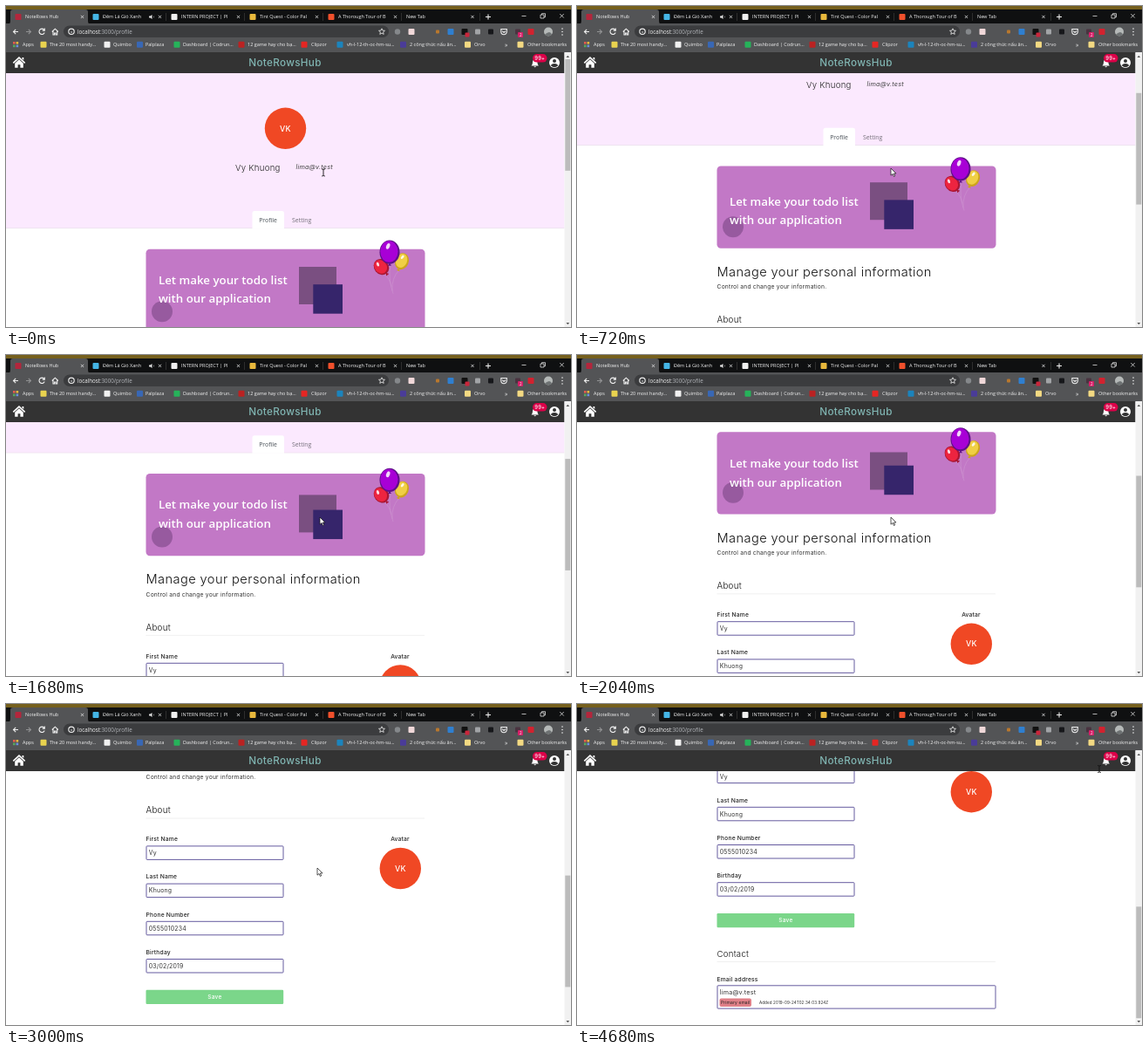
Animation, 648 px wide and 368 px high, one loop 4.8 s. Source, as an HTML page:

```html
<!DOCTYPE html>
<html lang="en">
<head>
<meta charset="utf-8">
<title>NoteRows Hub</title>
<style>
html, body { margin: 0; width: 100%; height: 100%; overflow: hidden; background: #fff; }
svg { display: block; width: 100vw; height: 100vh; }
text { font-family: Inter, sans-serif; letter-spacing: .029em; white-space: pre; }
.ui { font-family: "Open Sans", "Noto Sans", sans-serif; letter-spacing: 0; }
.mid { text-anchor: middle; }
.line { fill: none; stroke: #ececec; stroke-width: .8; }
.icon { fill: none; stroke: #f0f0f0; stroke-width: 1.1; }
</style>
</head>
<body>
<svg id="stage" viewBox="0 0 648 368"></svg>
<script>
const text = (x, y, str, size, fill = '#222', attrs = '') =>
  `<text x="${x}" y="${y}" font-size="${size}" fill="${fill}" ${attrs}>${str}</text>`;
const ui = (x, y, str, size = 5.5, fill = '#f4f4f4', attrs = '') =>
  text(x, y, str, size, fill, `class="ui" ${attrs}`);
const rect = (x, y, w, h, fill, r = 0, attrs = '') =>
  `<rect x="${x}" y="${y}" width="${w}" height="${h}" rx="${r}" fill="${fill}" ${attrs}/>`;
const disc = (x, y, r, fill) => `<circle cx="${x}" cy="${y}" r="${r}" fill="${fill}"/>`;
const path = (d, attrs = 'class="icon"') => `<path d="${d}" ${attrs}/>`;
const group = (id, content) => `<g id="${id}">${content}</g>`;
const cross = (x, y, s) => path(`M${x - s} ${y - s}l${2 * s} ${2 * s}m0 ${-2 * s}l${-2 * s} ${2 * s}`,
  'fill="none" stroke="#e8e8e8" stroke-width=".8"');
const square = (x, y, s, fill) => rect(x - s / 2, y - s / 2, s, s, fill, 1);

const CHROME = '#535456';
const user = { first: 'Vy', last: 'Khuong', initials: 'VK', mail: 'lima@v.test', phone: '0555010234' };

function tabStrip() {
  const tabs = [
    [10, 'NoteRows Hub', '#b3263c'],
    [99, 'Đêm Lá Gió Xanh', '#45b5e6'],
    [189, 'INTERN PROJECT | Pl', '#f0f0f0'],
    [279, 'Tint Quest - Color Pal', '#e8b83c'],
    [369, 'A Thorough Tour of B', '#f0502c'],
    [459, 'New Tab']
  ];
  let out = rect(0, 0, 648, 5, '#76601e') + rect(0, 4, 648, 17, '#0f1011') +
    path('M2 21Q5 21 5 17V7q0-3 3-3H91q3 0 3 3V17q0 4 3 4z', `fill="${CHROME}"`);
  tabs.forEach(([x, name, color], i) => {
    if (color) out += square(x + 4, 12.5, 7, color);
    out += ui(color ? x + 12 : x, 14.3, name) + cross(i == 5 ? 535 : x + 77.5, 12.4, 1.6);
    if (i) out += rect(x + 84, 8, .6, 9, '#444');
  });
  return out +
    path('M164 11.5h1.5l2-1.5v5l-2-1.5H164zM169 11q1 1.500 0 3', 'fill="#ddd"') +
    path('M550 12.500h6M553 9.500v6') +
    path('M591.500 11.500h5M613 10h4v4h-4zM614.500 10V8.700h4v4H617', 'fill="none" stroke="#ddd" stroke-width=".8"') +
    cross(637.5, 11.3, 2.2);
}

function toolBar() {
  const extensions = [
    [495, 4, '#b9782d'], [510, 7, '#2f7fd0'], [526, 7, '#111'], [541, 6, '#a2a4a7'],
    [556, 6, '#16171a'], [587, 6, '#4a3340'], [602, 7, '#d3222f']
  ];
  return rect(0, 20, 648, 33.5, CHROME) + rect(66, 22.5, 373, 13.5, '#3b3c3e', 6.7) +
    path('M14 29.500H8.500m2.700-2.700l-2.700 2.700 2.700 2.700') +
    path('M23 29.500h5.500m-2.700-2.700l2.700 2.700-2.700 2.700', 'class="icon" opacity=".4"') +
    path('M43.700 27.300A3.200 3.200 0 1 0 44.200 30.500M44.300 25.500v2.600h-2.600') +
    path('M52.800 29.500L56.300 26.200 59.800 29.500M54 29v4h1.600v-2h1.500v2h1.600v-4') +
    '<circle cx="75" cy="29.300" r="3.200" class="icon" stroke-width=".8"/>' + rect(74.6, 28.8, .9, 2.3, '#ddd') +
    ui(82, 31.5, 'localhost<tspan fill="#b4b7bb">:3000/profile</tspan>', 6.2) +
    path('M431 25.800l1 2.300 2.500.2-1.900 1.600.6 2.500-2.200-1.300-2.200 1.300.6-2.500-1.900-1.600 2.500-.2z', 'fill="none" stroke="#eee" stroke-width=".8"') +
    disc(449, 29.5, 3.2, '#85888b') + square(465, 29.5, 7, '#f0d8d9') +
    extensions.map(([x, s, color]) => square(x, 29.5, s, color)).join('') +
    square(529, 33, 5, '#c9263b') + square(590, 33, 6, '#d71f68') + ui(589, 35, '2', 4.5, '#fff') +
    path('M567.800 26.500h6.500v3a3.200 3.200 0 0 1-6.500 0zM569.300 28.700l1.800 1.700 1.800-1.700') +
    disc(622, 29.5, 5, '#b5b9b8') + path('M618 32.500a5 5 0 0 0 8 0q-2-5-8 0', 'fill="#6d7172"') +
    [26, 29.5, 33].map(y => disc(638, y, .8, '#eee')).join('');
}

function bookmarks() {
  const items = [
    [43, 50, 'The 20 most handy...', '#e9d34f'], [116, 123, 'Quimbo', '#f1f1f1'],
    [153.5, 160, 'Palplaza', '#3867b5'], [196, 203, 'Dashboard | Codrun...', '#26b35a'],
    [270, 277, '12 game hay cho bạ...', '#ba2222'], [342, 350, 'Clipzor', '#e52623'],
    [383, 391, 'vh-l-12-th-oc-hm-su...', '#1b84bd'], [455.5, 463, '2 công thức nấu ăn...', '#4a3c98'],
    [529.5, 537, 'Orvo', '#f3d982'], [590, 598, 'Other bookmarks', '#f3d982']
  ];
  let out = ui(19, 46.3, 'Apps') + ui(572, 46.5, '»', 6.5);
  ['#e45b4e', '#e8b83d', '#58a85c', '#6d8fdf'].forEach((color, i) => {
    out += rect(8 + i % 2 * 3.6, 41 + (i >> 1) * 3.6, 2.6, 2.6, color);
  });
  for (const [ix, x, name, color] of items) out += square(ix, 44.3, 7, color) + ui(x, 46.3, name);
  return out;
}

const header = () => rect(0, 53, 640.5, 24, '#333') +
  path('M7.800 64.800L15 58l7.200 6.800-1 1.200L15 60.200 8.800 66zM10.200 65.700L15 61.300l4.800 4.400v5h-3.400v-3.500h-2.800v3.500h-3.400zM18.500 59h1.800v3l-1.800-1.500z', 'fill="#fff"') +
  text(320, 69.3, 'NoteRowsHub', 11.7, '#80b5b2', 'class="mid" font-weight="500"') +
  path('M602.500 68.500q1.500-1.500 1.500-4 0-3 2.700-3.300 2.700.3 2.700 3.300 0 2.500 1.500 4zM605.300 69.200h2.800q-1.400 2-2.800 0', 'fill="#fff"') +
  rect(604, 55, 16.5, 9.6, '#dc0048', 4.8) + text(612.2, 61.9, '99+', 5.8, '#fff', 'class="mid" font-weight="500"') +
  disc(629, 65, 6, '#fff') + disc(629, 63, 2, '#333') +
  path('M625 68.500q0-2.500 4-2.500t4 2.500q-4 3.300-8 0', 'fill="#333"');

const avatar = (x, y) => disc(x, y, 23.7, '#f04824') +
  text(x, y + 3.2, user.initials, 8.8, '#fff', 'class="mid" font-weight="500"');

function balloon(x, y, rx, ry, turn, fill, shade) {
  return `<g transform="translate(${x} ${y}) rotate(${turn})">
    <path d="M0 ${ry - 1}l-2 3h4z" fill="${shade}"/>
    <ellipse rx="${rx}" ry="${ry}" fill="${shade}"/>
    <ellipse cx="-.6" cy="-.6" rx="${rx - 1.4}" ry="${ry - 1.4}" fill="${fill}"/>
    <ellipse cx="${-rx * .35}" cy="${-ry * .42}" rx="${rx * .18}" ry="${ry * .26}" fill="#fff" opacity=".85" transform="rotate(20)"/>
  </g>`;
}

const slogan = (y, str) => ui(175, y, str, 13.3, '#fff', 'font-weight="600"');

const banner = () => rect(160.5, 278.7, 320, 94.3, '#c278c6', 4.5) +
  group('back', rect(336, 300, 43, 43, '#7a4f81')) +
  group('front', rect(352.3, 319.2, 33.7, 33.5, '#36256b') + disc(179, 350.2, 12, '#975a9f')) +
  group('slogan', slogan(321.6, 'Let make your todo list') + slogan(343.1, 'with our application')) +
  group('balloons',
    path('M441 299Q438 315 444 332M434 310Q440 314 442 324M451 305Q442 314 443 329',
      'fill="none" stroke="#cd94d1" stroke-width=".6"') +
    balloon(454, 295, 7.8, 9.6, 22, '#f0cf45', '#cda51c') +
    balloon(430.5, 301.3, 8.3, 9.6, -38, '#ed2440', '#a91632') +
    balloon(440, 284.4, 11.5, 13.6, 0, '#a800d6', '#5f1088'));

const label = (x, y, str, attrs = '') => text(x, y, str, 6.7, '#222', `font-weight="500" ${attrs}`);
const heading = (y, str, size) => text(160.5, y, str, size, '#111', 'font-weight="300"');
const box = (y, w, h) => rect(161, y, w, h, '#fff', .8, 'stroke="#655b9f" stroke-width="1"');

function page() {
  const fields = [['First Name', user.first], ['Last Name', user.last],
    ['Phone Number', user.phone], ['Birthday', '03/02/2019']];
  return rect(0, 77, 640.5, 178, '#fbe9fe') + rect(0, 254.5, 640.5, .6, '#e6dde8') +
    avatar(320.5, 140.3) +
    text(263, 188.8, `${user.first} ${user.last}`, 9.6, '#222', 'font-weight="300"') +
    text(332.5, 187.3, user.mail, 7.3, '#444', 'font-style="italic"') +
    path('M282.500 255.500V237.500q0-2.500 2.500-2.500h31.500q2.500 0 2.500 2.500v18z', 'fill="#fff"') +
    ui(300.5, 247.8, 'Profile', 6.9, '#495057', 'text-anchor="middle"') +
    ui(339.2, 247.8, 'Setting', 6.9, '#75707a', 'text-anchor="middle"') +
    banner() +
    heading(405, 'Manage your personal information', 14.6) +
    text(160.5, 419.5, 'Control and change your information.', 6.75, '#333') +
    heading(458.5, 'About', 9.8) + path('M160.500 464.200H480', 'class="line"') +
    fields.map(([name, value], i) => {
      const y = 490.5 + i * 43.2;
      return label(160.5, y, name) + box(y + 5.6, 157, 15.5) + text(163.8, y + 16, value, 6.9, '#333');
    }).join('') +
    label(452, 490.5, 'Avatar', 'class="mid"') + avatar(452.3, 521.7) +
    rect(160.5, 661, 157.7, 16.2, '#7bd68a', 1.2) +
    text(239.4, 671.4, 'Save', 6.6, '#fff', 'class="mid" font-weight="500"') +
    heading(710.5, 'Contact', 9.6) + path('M160.500 716.500H480', 'class="line"') +
    label(160.5, 738.5, 'Email address') + box(743.8, 319, 26.3) +
    text(163.8, 754.3, user.mail, 7.2, '#333') +
    rect(163.5, 758.4, 36.5, 9.5, '#e08088', 2) +
    text(181.7, 765, 'Primary email', 4.9, '#222', 'class="mid"') +
    text(209, 765, 'Added 2019-09-24T02:34:03.924Z', 4.5);
}

document.getElementById('stage').innerHTML =
  group('page', page()) + tabStrip() + toolBar() + bookmarks() + header() +
  rect(640.5, 53, 7.5, 315, '#f1f1f1') + rect(641.3, 61, 6, 127.8, '#bcbcbc', 0, 'id="thumb"') +
  path('M642.500 59l1.800-2.200 1.800 2.200zM642.500 363l1.800 2.200 1.800-2.200z', 'fill="#555"') +
  path('M0 0V8.200L2 6.500 3.400 9.500 4.700 8.900 3.300 6H6z', 'id="arrow" fill="#fff" stroke="#111" stroke-width=".7"') +
  path('M-1.800-4Q0-4 0-3 0-4 1.800-4M0-3V3M-1.800 4Q0 4 0 3 0 4 1.800 4', 'id="beam" fill="none" stroke="#111" stroke-width=".9"');

const byId = id => document.getElementById(id);
const move = (id, x, y) => byId(id).setAttribute('transform', `translate(${x} ${y})`);
const show = (id, on) => byId(id).setAttribute('visibility', on ? 'visible' : 'hidden');

const LOOP = 4800, STEP = 120, MAX_SCROLL = 421;
const wheel = [240, 480, 960, 1680, 2160, 2400, 2700, 3120, 3400];

// Banner parts bob up and down: id, amplitude, period, time of the highest point
const floats = [
  ['slogan', 3, 1800, 0],
  ['front', 2.8, 1800, 450],
  ['back', 3.2, 2400, 480],
  ['balloons', 2.8, 3600, 360]
];

// Smooth progress from 0 to 1 between two times
function ease(t, from, to) {
  const p = Math.min(1, Math.max(0, (t - from) / (to - from)));
  return p * p * (3 - 2 * p);
}

function draw(now) {
  const t = Math.floor(now % LOOP / STEP) * STEP;
  const scroll = Math.min(MAX_SCROLL, wheel.reduce((sum, start) => sum + 47.6 * ease(t, start, start + 200), 0));
  move('page', 0, -scroll);
  byId('thumb').setAttribute('y', 61 + scroll * .407);
  for (const [id, amp, period, top] of floats) {
    move(id, 0, -amp * Math.cos(2 * Math.PI * (t - top) / period));
  }

  const settle = ease(t, 120, 360), drift = ease(t, 2160, 2640), leave = ease(t, 4080, 4680);
  const x = 364 - 4 * settle - 3 * drift + 242 * leave;
  const y = 191 - 5 * settle + 2 * drift - 113.5 * leave;
  const overText = t < 240 || t >= 4680;
  show('arrow', !overText);
  show('beam', overText);
  move('arrow', x, y);
  move('beam', x, y);
}

const start = performance.now();
function tick() {
  draw(performance.now() - start);
  requestAnimationFrame(tick);
}
tick();
</script>
</body>
</html>
```
